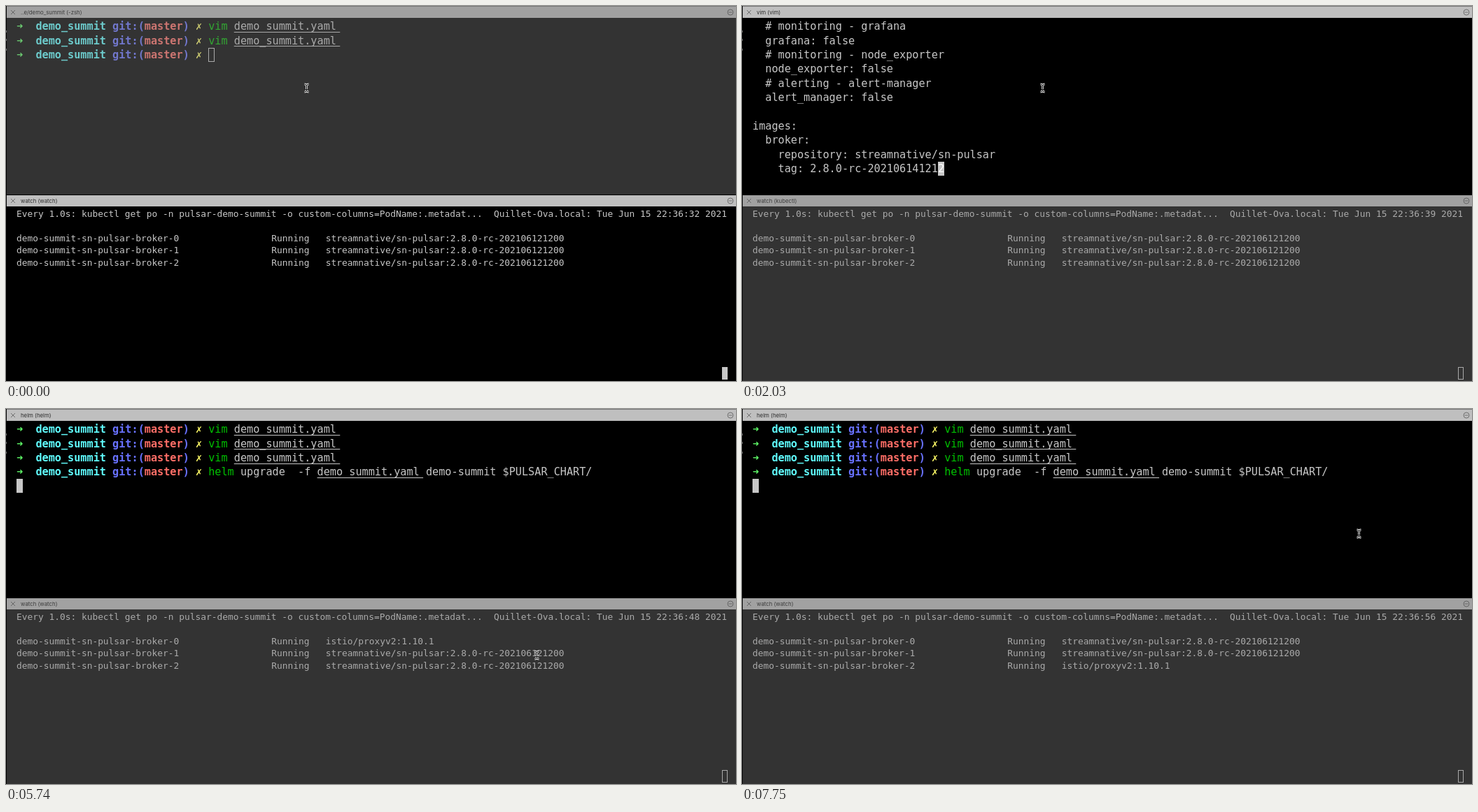
Recreate the animation shown at these times as an HTML page with a canvas. Size 1043 by 537 pixels, loop 8 s.

```html
<!DOCTYPE html>
<html lang="en">
<head>
<meta charset="utf-8">
<title>Terminal session</title>
<style>
  html, body { margin: 0; width: 100%; height: 100%; overflow: hidden; background: #000; }
  canvas { display: block; }
</style>
</head>
<body>
<canvas id="stage" width="1043" height="537"></canvas>
<script>
const ctx = document.getElementById('stage').getContext('2d');
const LOOP = 8000, W = 1043, H = 537;
const MONO = '"DejaVu Sans Mono", "Liberation Mono", monospace';
const UI = 'Inter, "Liberation Sans", sans-serif';

const C = {
  bg: [0, 0, 0], text: [199, 199, 199], white: [255, 255, 255],
  lime: [95, 250, 104], cyan: [96, 253, 255], blue: [104, 113, 255],
  red: [255, 110, 103], yellow: [254, 251, 103], green: [0, 194, 0], error: [201, 27, 0]
};

// Text grids of the two panes
const TOP = { x: 15, y: 18.8, cw: 9.14, ch: 20.4, base: 15.4, size: 15.18, bar: 0, end: 270 };
const LOW = { x: 15, y: 288.2, cw: 7.75, ch: 17.6, base: 13.3, size: 12.87, bar: 271, end: H };

// Value of the last [time, value] step that has been reached
const step = (t, list) => list.reduce((v, [at, next]) => (t >= at ? next : v), list[0][1]);
const during = (t, a, b) => t >= a && t < b;

const FIRST_SECOND = 32;
const TICKS = [150, 370, 700, 1000, 1310, 1650, 1950, 2350, 2680, 2980, 3460, 4050,
  4340, 4580, 5000, 5450, 5800, 5950, 6150, 6400, 6530, 6900, 7600, 7750];

const POINTER = [
  [0, 429, 117], [2220, 429, 117], [2300, 400, 110], [2550, 217, 232], [2980, 463, 236],
  [4820, 463, 236], [5200, 640, 478], [5600, 758, 352], [5790, 758, 352],
  [6050, 786, 356], [6430, 773, 334], [6720, 773, 334], [7160, 881, 178], [LOOP, 881, 178]
];

const rgb = (c, dim) => `rgb(${c.map(v => Math.round(dim ? v * 0.6 + 51 : v))})`;

function write(g, row, col, text, color, bold) {
  ctx.font = `${bold ? 'bold ' : ''}${g.size}px ${MONO}`;
  ctx.fillStyle = rgb(color || C.text, g.dim);
  ctx.fillText(text, g.x + col * g.cw, g.y + row * g.ch + g.base);
}

function caret(g, row, col, under) {
  const x = Math.round(g.x + col * g.cw), y = Math.round(g.y + row * g.ch);
  const w = Math.round(g.cw), h = Math.round(g.ch);
  if (g.dim) {
    ctx.strokeStyle = rgb(C.text, true);
    ctx.lineWidth = 1;
    ctx.strokeRect(x + 0.5, y + 0.5, w - 1, h - 1);
  } else {
    ctx.fillStyle = rgb(C.text);
    ctx.fillRect(x, y, w, h);
    if (under) write(g, row, col, under, C.white);
  }
}

function pane(g, title) {
  ctx.fillStyle = rgb(C.bg, g.dim);
  ctx.fillRect(1, g.bar, W - 1, g.end - g.bar);
  ctx.fillStyle = g.dim ? '#a1a1a1' : '#bfbfbf';
  ctx.fillRect(1, g.bar, W - 1, g.bar ? 16 : 17);
  if (!g.bar) {
    ctx.fillStyle = '#777';
    ctx.fillRect(1, 0, W - 1, 1);
  }
  const y = g.bar ? 279 : 9;
  ctx.strokeStyle = g.dim ? '#666' : '#707070';
  ctx.lineWidth = 1;
  ctx.beginPath();
  ctx.moveTo(7, y - 3); ctx.lineTo(13, y + 3);
  ctx.moveTo(13, y - 3); ctx.lineTo(7, y + 3);
  ctx.moveTo(1039, y); ctx.arc(1035, y, 4, 0, Math.PI * 2);
  ctx.moveTo(1032.5, y); ctx.lineTo(1037.5, y);
  ctx.stroke();
  ctx.font = `7.8px ${UI}`;
  ctx.fillStyle = g.dim ? '#3c3c3c' : '#2c2c2c';
  ctx.fillText(title, 21, y + 2.8);
}

function prompt(row) {
  const parts = [[0, '➜', C.lime], [3, 'demo_summit', C.cyan], [15, 'git:(', C.blue],
    [20, 'master', C.red], [26, ')', C.blue], [28, '✗', C.yellow]];
  for (const [col, text, color] of parts) write(TOP, row, col, text, color, true);
}

function fileName(row, col) {
  write(TOP, row, col, 'demo_summit.yaml');
  ctx.fillRect(TOP.x + col * TOP.cw, Math.round(TOP.y + row * TOP.ch + 18), 151.5, 1);
}

function vimLine(row) {
  prompt(row);
  write(TOP, row, 30, 'vim', C.green);
  fileName(row, 34);
}

function helmLine(row) {
  write(TOP, row, 30, 'helm', C.green);
  write(TOP, row, 35, 'upgrade  -f');
  fileName(row, 47);
  write(TOP, row, 64, 'demo-summit $PULSAR_CHART/');
}

function shell(t) {
  vimLine(0);
  vimLine(1);
  if (t < 250) {
    prompt(2);
    return caret(TOP, 2, 30);
  }
  vimLine(2);
  if (t < 560) return caret(TOP, 2, 50);
  if (t < 3660) return caret(TOP, 3, 0);
  prompt(3);
  if (t < 4290) {
    const typed = 'helm'.slice(0, step(t, [[0, 0], [4000, 1], [4100, 2], [4150, 3], [4200, 4]]));
    write(TOP, 3, 30, typed, typed === 'helm' ? C.green : C.error);
    return caret(TOP, 3, 30 + typed.length);
  }
  helmLine(3);
  if (t < 4480) caret(TOP, 3, 90);
  else caret(TOP, 4, 0);
}

function tagAt(t) {
  const before = '202106121200', after = '202106141212';
  if (t < 1500) {
    const gone = step(t, [[0, 0], [940, 1], [1050, 2], [1110, 3], [1170, 4], [1230, 5]]);
    return before.slice(0, 12 - gone);
  }
  const typed = step(t, [[1500, 1], [1570, 2], [1720, 3], [1800, 4], [1880, 5]]);
  return after.slice(0, 7 + typed);
}

function editor(t) {
  const tag = '    tag: 2.8.0-rc-' + tagAt(t);
  const lines = ['  # monitoring - grafana', '  grafana: false', '  # monitoring - node_exporter',
    '  node_exporter: false', '  # alerting - alert-manager', '  alert_manager: false', '',
    'images:', '  broker:', '    repository: streamnative/sn-pulsar', tag];
  lines.forEach((line, row) => write(TOP, row, 0, line));
  if (during(t, 800, 2030)) {
    write(TOP, 11, 0, '-- INSERT --', C.white, true);
    caret(TOP, 10, tag.length);
  } else if (t >= 3370) {
    const cmd = t < 3420 ? ':' : ':wq';
    write(TOP, 11, 0, cmd);
    caret(TOP, 11, cmd.length);
  } else {
    caret(TOP, 10, tag.length - 1, tag.at(-1));
  }
}

function watch(t) {
  const sec = FIRST_SECOND + TICKS.filter(at => t >= at).length;
  write(LOW, 0, 0, 'Every 1.0s: kubectl get po -n pulsar-demo-summit -o custom-columns=PodName:.metadat...');
  write(LOW, 0, 88, `Quillet-Ova.local: Tue Jun 15 22:36:${sec} 2021`);
  const proxied = [
    during(t, 5450, 5800),
    during(t, 3460, 4340) || during(t, 6150, 6530),
    t >= 7750
  ];
  proxied.forEach((proxy, i) => {
    write(LOW, 2 + i, 0, 'demo-summit-sn-pulsar-broker-' + i);
    write(LOW, 2 + i, 47, 'Running');
    write(LOW, 2 + i, 57, proxy ? 'istio/proxyv2:1.10.1' : 'streamnative/sn-pulsar:2.8.0-rc-202106121200');
  });
  caret(LOW, 13, 130);
}

function pointer(t) {
  const i = POINTER.findIndex(p => p[0] > t);
  const [t0, x0, y0] = POINTER[i - 1], [t1, x1, y1] = POINTER[i];
  const k = (t - t0) / (t1 - t0), e = k * k * (3 - 2 * k);
  ctx.save();
  ctx.translate(Math.round(x0 + (x1 - x0) * e) + 0.5, Math.round(y0 + (y1 - y0) * e) + 0.5);
  ctx.beginPath();
  for (const s of [-1, 1]) {
    ctx.moveTo(-3, s * 5.5);
    ctx.quadraticCurveTo(0, s * 5.5, 0, s * 3);
    ctx.quadraticCurveTo(0, s * 5.5, 3, s * 5.5);
  }
  ctx.moveTo(0, -4); ctx.lineTo(0, 4);
  ctx.moveTo(-1.5, 2); ctx.lineTo(1.5, 2);
  ctx.strokeStyle = '#e8e8e8';
  ctx.lineWidth = 2.8;
  ctx.stroke();
  ctx.strokeStyle = '#111';
  ctx.lineWidth = 1;
  ctx.stroke();
  ctx.restore();
}

function draw(t) {
  ctx.fillStyle = '#000';
  ctx.fillRect(0, 0, W, H);
  ctx.fillStyle = '#666';
  for (const y of [35, 47, 61]) ctx.fillRect(0, y, 1, 3);

  const lowFocus = t < 50 || during(t, 6670, 7560);
  TOP.dim = lowFocus;
  LOW.dim = !lowFocus;

  pane(TOP, step(t, [[0, '..e/demo_summit (-zsh)'], [560, 'vim (-zsh)'], [620, 'vim (vim)'],
    [3510, '..e/demo_summit (vim)'], [3810, '..e/demo_summit (-zsh)'],
    [4530, 'helm (-zsh)'], [4820, 'helm (helm)']]));
  if (during(t, 620, 3510)) editor(t);
  else shell(t);

  const busy = during(t, 1170, 1310) || during(t, 1950, 2080) || during(t, 3460, 4050);
  pane(LOW, busy ? 'watch (kubectl)' : 'watch (watch)');
  watch(t);
  pointer(t);
}

const start = performance.now();
function frame() {
  draw((performance.now() - start) % LOOP);
  requestAnimationFrame(frame);
}
frame();
</script>
</body>
</html>
```
